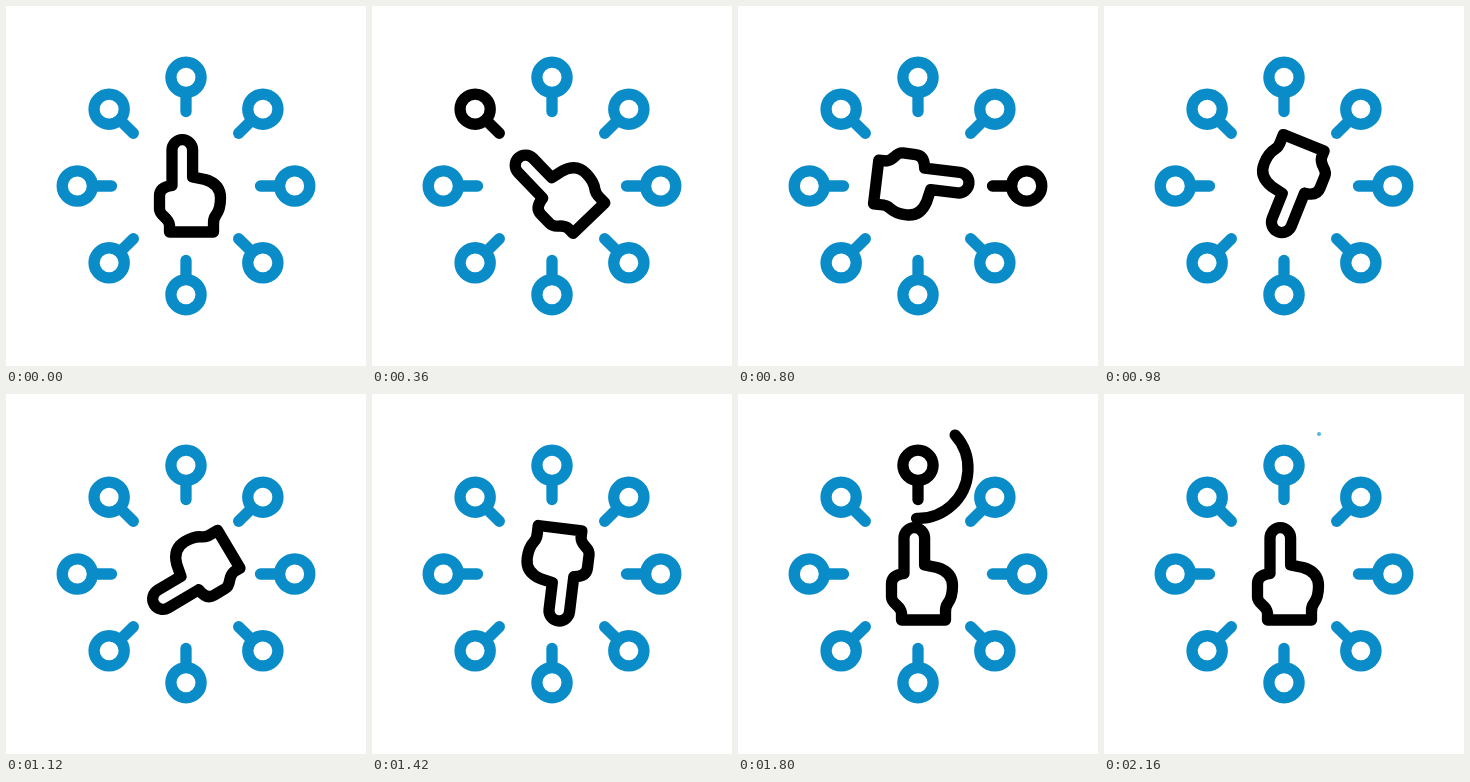
Write an HTML page that moves like this. It is 360 by 360 pixels and loops after 2.4 s.

```html
<!DOCTYPE html>
<html lang="en">
<head>
<meta charset="utf-8">
<title>Pointing hand</title>
<style>
  html, body { margin: 0; width: 100%; height: 100%; overflow: hidden; background: #fff; }
  svg { display: block; width: 100%; height: 100%; }
</style>
</head>
<body>
<svg viewBox="0 0 360 360" fill="none" stroke="#000" stroke-width="11.3" stroke-linecap="round" stroke-linejoin="round">
  <g id="nodes"></g>
  <path id="hand" d="M166 179.5V144a10.3 10.3 0 0 1 20.6 0V171L199 173.5Q214.5 178 214.5 192Q214.5 203 210 209Q207 213 207.5 219V226H163.5V219Q163 215 158.500 211Q153.500 207 153.500 203V190Q153.500 181 166 179.500"/>
  <path id="loop" pathLength="1"/>
  <circle id="speck" cx="215" cy="40" r="2" fill="#4db8e0" stroke="none"/>
</svg>
<script>
const LOOP = 2400;
const BLUE = '#0a8cc8';
const NS = 'http://www.w3.org/2000/svg';
const $ = id => document.getElementById(id);

// Stops of the hand: time in ms, angle in degrees
const stops = [[0, 0], [400, -45], [760, 90], [1060, 225], [1660, 720]];

// Node index (clockwise from the top) and the time it is black
const picks = [[7, 330, 460], [2, 690, 820], [5, 1000, 1110], [0, 1600, 2080]];

const progress = (t, from, to) => Math.min(1, Math.max(0, (t - from) / (to - from)));
const smooth = u => u * u * (3 - 2 * u);

const nodes = Array.from({ length: 8 }, (_, i) => {
  const node = document.createElementNS(NS, 'g');
  node.setAttribute('transform', `rotate(${i * 45} 180 180)`);
  node.innerHTML = '<circle cx="180" cy="71.3" r="15.1"/><path d="M180 88V105.500"/>';
  $('nodes').append(node);
  return node;
});

// Counter-clockwise circle around the top node, starting at its upper right
const cx = 180, cy = 74.5, r = 50, start = -42 * Math.PI / 180;
const dx = r * Math.cos(start), dy = r * Math.sin(start);
$('loop').setAttribute('d',
  `M${cx + dx} ${cy + dy}A${r} ${r} 0 0 0 ${cx - dx} ${cy - dy}A${r} ${r} 0 0 0 ${cx + dx} ${cy + dy}`);

function handAngle(t) {
  for (let i = 1; i < stops.length; i++) {
    const [t0, a0] = stops[i - 1], [t1, a1] = stops[i];
    if (t < t1) return a0 + (a1 - a0) * smooth(progress(t, t0, t1));
  }
  return 0;
}

function render(t) {
  $('hand').setAttribute('transform', `rotate(${handAngle(t)} 184 180)`);

  nodes.forEach((node, i) => {
    const lit = picks.some(([n, on, off]) => n === i && t >= on && t < off);
    node.setAttribute('stroke', lit ? '#000' : BLUE);
  });

  const head = smooth(progress(t, 1500, 1720));
  const tail = 1 - (1 - progress(t, 1640, 2100)) ** 2.3;
  const loop = $('loop');
  loop.style.display = head > tail ? '' : 'none';
  loop.setAttribute('stroke-dasharray', `${Math.max(0, head - tail)} 2`);
  loop.setAttribute('stroke-dashoffset', -tail);

  $('speck').style.display = t >= 2100 ? '' : 'none';
}

const begin = performance.now();
function tick() {
  render((performance.now() - begin) % LOOP);
  requestAnimationFrame(tick);
}
tick();
</script>
</body>
</html>
```
